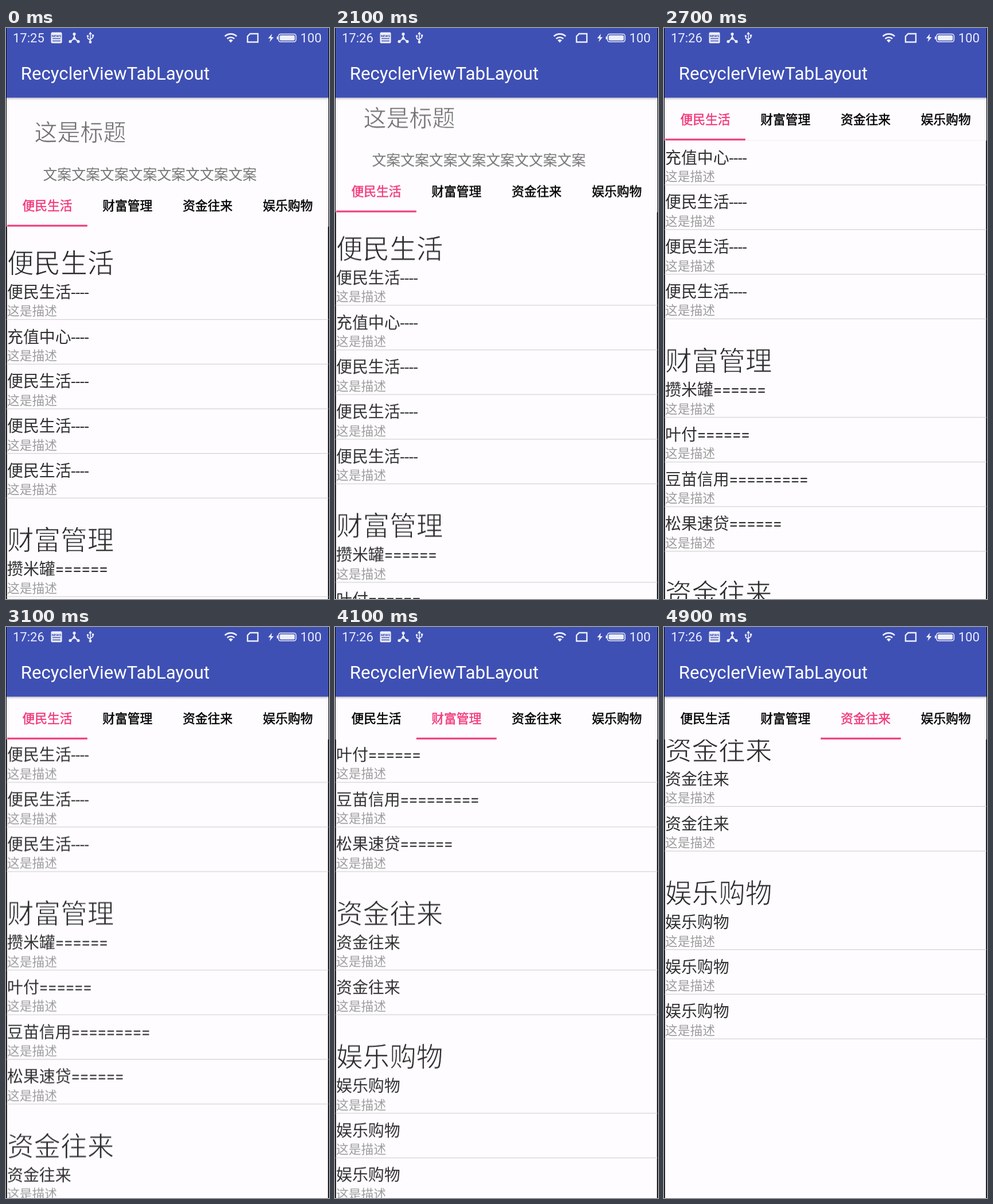
Recreate the animation shown at these times as an HTML page. Size 563 by 994 pixels, loop 5 s.

```html
<!DOCTYPE html>
<html lang="zh-CN">
<head>
<meta charset="utf-8">
<title>RecyclerViewTabLayout</title>
<style>
  html, body { margin: 0; width: 100%; height: 100%; overflow: hidden; background: #000; }
  svg { display: block; width: 100%; height: 100%; }
  text { font-family: Roboto, "Noto Sans CJK SC", "Noto Sans CJK", sans-serif; white-space: pre; }
  .paper { fill: #fefcff; }
  .bar { fill: #3f50b4; }
  /* a paper-coloured outline thins the large type */
  .head { font-size: 46.6px; fill: #2c2c2c; stroke: #fefcff; stroke-width: 1px; }
  .item { font-size: 27.9px; fill: #303030; }
  .desc { font-size: 21.75px; fill: #9c9c9c; }
  .rule { fill: #d3d1d4; }
  .title { font-size: 40px; fill: #707070; stroke: #fefcff; stroke-width: .7px; }
  .sub { font-size: 24.85px; fill: #757575; }
  .tab { font-size: 21.75px; text-anchor: middle; stroke: currentColor; stroke-width: .5px; fill: currentColor; color: #000; }
  .pink { fill: #f23a7a; }
  .app { font-size: 31.15px; fill: #fff; }
  .status { font-size: 22px; fill: #eceef9; }
  .solid { fill: #eceef9; }
  .line { fill: none; stroke: #eceef9; stroke-width: 2; }
</style>
</head>
<body>
<svg viewBox="0 0 563 994">
  <defs>
    <linearGradient id="shade" x2="0" y2="1">
      <stop offset="0" stop-color="#555" stop-opacity=".4"/>
      <stop offset=".4" stop-color="#777" stop-opacity=".2"/>
      <stop offset="1" stop-color="#999" stop-opacity="0"/>
    </linearGradient>
    <clipPath id="screen"><rect x="1.7" width="559.6" height="994"/></clipPath>
  </defs>
  <rect width="563" height="994"/>
  <g clip-path="url(#screen)">
    <rect class="paper" width="563" height="994"/>
    <g id="list"></g>
    <g id="header">
      <rect class="paper" width="563" height="345.8"/>
      <text class="title" x="49.5" y="195.7">这是标题</text>
      <text class="sub" x="64.5" y="264">文案文案文案文案文案文文案文案</text>
      <g id="tabs"></g>
      <rect id="mark" class="pink" x="2" y="342.6" width="139.8" height="3.1"/>
    </g>
    <rect class="bar" width="563" height="121.3"/>
    <rect y="121.3" width="563" height="5" fill="url(#shade)"/>
    <text class="app" x="25.8" y="90">RecyclerViewTabLayout</text>

    <text id="early" class="status" x="12" y="25">17:25</text>
    <text id="late" class="status" x="12" y="25">17:26</text>
    <text class="status" x="513" y="25">100</text>

    <rect class="solid" x="78.5" y="7.5" width="19" height="19" rx="2"/>
    <text class="bar" x="88" y="15.5" font-size="6" font-weight="700" text-anchor="middle">NEWS</text>
    <path d="M81 18.5h14M81 22.5h14" stroke="#3f50b4" stroke-width="1.5"/>

    <path class="line" d="M119 10v8l-7.5 6M119 18l7.5 6" stroke-width="2.4"/>
    <g class="solid">
      <circle cx="119" cy="10.5" r="2.6"/>
      <circle cx="112" cy="23.5" r="2.6"/>
      <circle cx="126" cy="23.5" r="2.6"/>
      <circle cx="119" cy="18" r="2.6"/>
    </g>

    <path class="line" d="M147 10v14M147 21.5l-4.5-3.5v-4M147 20l4.5-3.5v-3" style="stroke-width:1.6"/>
    <g class="solid">
      <path d="M147 6.5l3 4.5h-6z"/>
      <circle cx="147" cy="24.5" r="2.4"/>
      <circle cx="142.5" cy="14" r="1.8"/>
      <rect x="149.8" y="11.5" width="3.4" height="3.4"/>
    </g>

    <g class="line" style="stroke-width:2.6">
      <path d="M381.5 14.5a15 15 0 0 1 20.6 0"/>
      <path d="M385.5 18.7a9.2 9.2 0 0 1 12.6 0"/>
    </g>
    <path class="solid" d="M391.8 25.5l-3.8-4.3a5.5 5.5 0 0 1 7.6 0z"/>
    <path class="line" d="M425.5 10H439v14.5h-18V14.5z" style="stroke-width:2.4"/>
    <path class="solid" d="M463.5 10l-6.5 8h4l-1.5 6.5 7-8.5h-4z"/>
    <rect class="line" x="475" y="10.5" width="30.5" height="13.5" rx="3.5" style="stroke-width:1.5"/>
    <rect class="solid" x="477.2" y="12.7" width="26.1" height="9.1" rx="1.8"/>
    <rect class="solid" x="472" y="14.5" width="2" height="5.5" rx="1"/>
  </g>
</svg>
<script>
const LOOP = 5000, STEP = 100;
const ROW = 77.7, GAP = 93.8, TAB = 139.8, COLLAPSE = 150;
const byId = id => document.getElementById(id);

function add(parent, name, attrs, text = '') {
  const el = document.createElementNS('http://www.w3.org/2000/svg', name);
  for (const key in attrs) el.setAttribute(key, attrs[key]);
  el.textContent = text;
  parent.append(el);
  return el;
}

const sections = [
  ['便民生活', ['便民生活----', '充值中心----', '便民生活----', '便民生活----', '便民生活----']],
  ['财富管理', ['攒米罐======', '叶付======', '豆苗信用=========', '松果速贷======']],
  ['资金往来', ['资金往来', '资金往来']],
  ['娱乐购物', ['娱乐购物', '娱乐购物', '娱乐购物']]
];

// y is the rule under the latest row
let y = 336;
const tabs = [], starts = [];
sections.forEach(([name, rows], i) => {
  starts.push(y);
  y += GAP;
  add(byId('list'), 'text', { class: 'head', x: 2, y: y - 3.7 }, name);
  for (const row of rows) {
    y += ROW;
    add(byId('list'), 'text', { class: 'item', x: 2, y: y - 37.6 }, row);
    add(byId('list'), 'text', { class: 'desc', x: 2, y: y - 7.1 }, '这是描述');
    add(byId('list'), 'rect', { class: 'rule', x: 0, y: y - .6, width: 563, height: 1.2 });
  }
  tabs.push(add(byId('tabs'), 'text', { class: 'tab', x: 2 + TAB * (i + .5), y: 317 }, name));
});

// time, scroll offset, speed per 100 ms
const path = [
  [1950, 0, 0], [2400, 157.5, 48], [2800, 330, 0], [2900, 330, 0], [3100, 392.5, 55],
  [3500, 635.5, 45], [4100, 797.2, 10], [4700, 1042, 35], [4900, 1082, 10]
];

function scroll(t) {
  if (t <= path[0][0]) return 0;
  const i = Math.max(1, path.findIndex(p => p[0] >= t));
  const [t0, a, va] = path[i - 1], [t1, b, vb] = path[i];
  const d = t1 - t0, u = (t - t0) / d, w = 1 - u;
  return a * w * w * (1 + 2 * u) + b * u * u * (3 - 2 * u)
    + (va * u * w * w - vb * u * u * w) * d / 100;
}

const selected = t => starts.filter((top, i) => i && scroll(t) > top - 196).length;

function ease(t, start) {
  const u = Math.min(1, Math.max(0, (t - start) / 300));
  return 1 - (1 - u ** 1.5) ** 3;
}

const shift = (x, y) => ({ transform: `translate(${x.toFixed(2)}px, ${y.toFixed(2)}px)` });

// the screen refreshes ten times a second
function play(el, pose) {
  const frames = [];
  for (let t = 0; t < LOOP; t += STEP)
    frames.push({ ...pose(t), offset: Math.max(0, t - 2) / LOOP, easing: 'step-end' });
  frames.push({ ...pose(LOOP - STEP), offset: 1 });
  el.animate(frames, { duration: LOOP, iterations: Infinity });
}

play(byId('list'), t => shift(0, -scroll(t)));
play(byId('header'), t => shift(0, -Math.min(COLLAPSE, scroll(t))));
play(byId('mark'), t => shift(TAB * (ease(t, 3500) + ease(t, 4685)), 0));
play(byId('early'), t => ({ opacity: t < 1500 ? 1 : 0 }));
play(byId('late'), t => ({ opacity: t < 1500 ? 0 : 1 }));
tabs.forEach((tab, i) => play(tab, t => ({ color: selected(t) === i ? '#f23a7a' : '#000' })));
</script>
</body>
</html>
```
